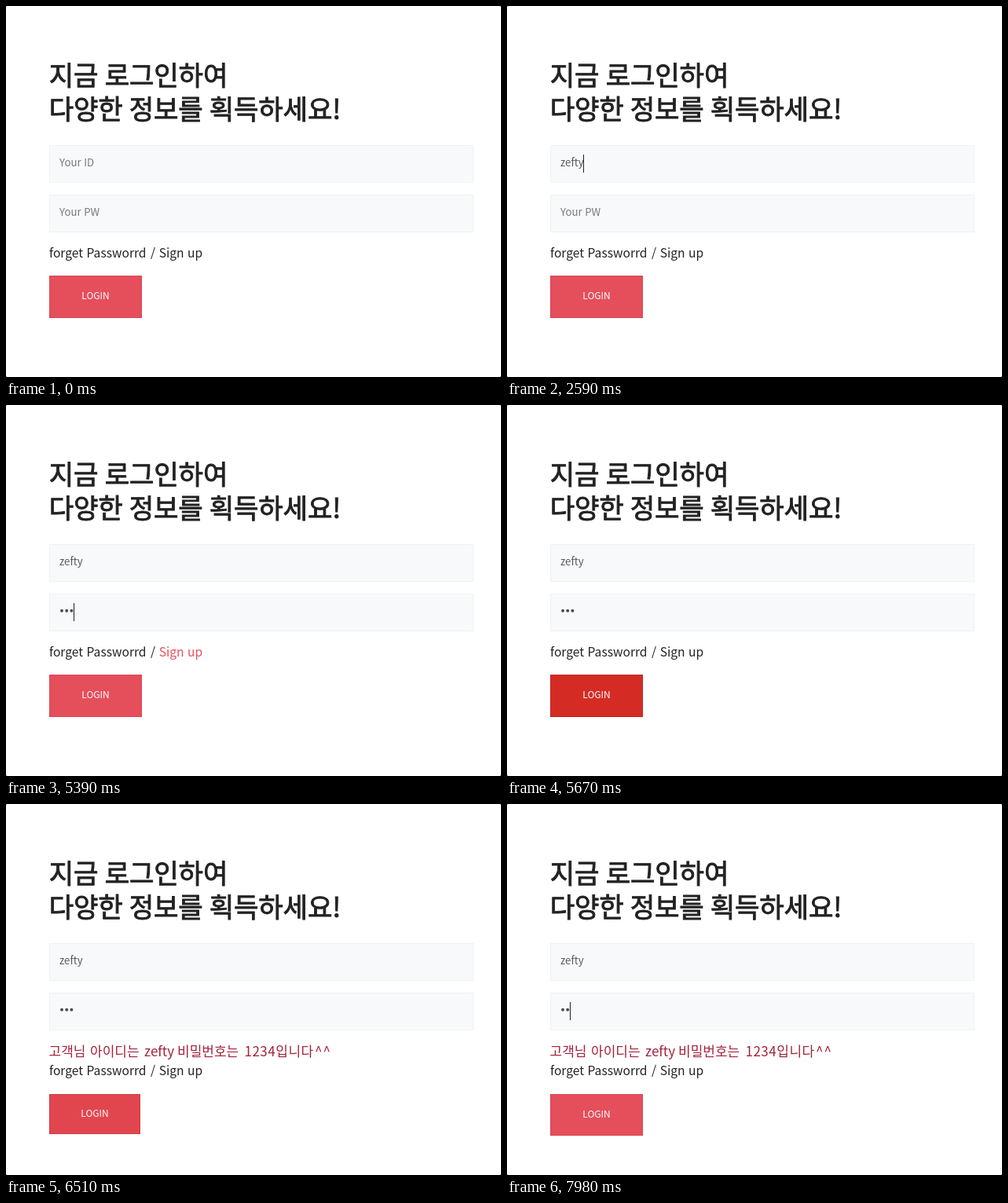
Recreate the animation shown at these times as an HTML page. Size 630x472 px, loop 8000 ms.

```html
<!DOCTYPE html>
<html lang="ko">
<head>
<meta charset="utf-8">
<title>Login form</title>
<style>
  html, body { margin: 0; width: 100%; height: 100%; overflow: hidden; background: #fff; }
  svg { display: block; width: 630px; height: 472px; }
  text { font-family: "Noto Sans CJK KR", "Noto Sans CJK", "Noto Sans", sans-serif; white-space: pre; }
  .head { font-size: 34.2px; font-weight: 500; letter-spacing: -.15px; fill: #222; stroke: #222; stroke-width: .9px; }
  .field { fill: #f8f9fb; stroke: #f1f1f3; }
  .input { font-size: 13.2px; fill: #55595e; }
  .hint { font-size: 13.2px; fill: #77797c; }
  .links { font-size: 15.6px; fill: #222; }
  .error { font-size: 17px; font-weight: 300; fill: #a3213b; }
  .label { font-size: 12px; fill: #fff; text-anchor: middle; }
  .caret { fill: #222; }
</style>
</head>
<body>
<svg viewBox="0 0 630 472">
  <rect width="630" height="472" fill="#fff"/>
  <path d="M0 0h1v1h-1zM629 0h1v1h-1zM0 471h1v1h-1zM629 471h1v1h-1z" fill="#888"/>
  <text class="head" y="100.5"><tspan x="54.7">지금</tspan><tspan x="125.7">로그인하여</tspan></text>
  <text class="head" y="143.5"><tspan x="54.7">다양한</tspan><tspan x="156.7">정보를</tspan><tspan x="258.7">획득하세요!</tspan></text>

  <rect class="field" x="55.5" y="177.5" width="539" height="47"/>
  <rect class="field" x="55.5" y="240.5" width="539" height="47"/>
  <text class="hint" id="idHint" x="68" y="204">Your ID</text>
  <text class="input" id="idText" x="68" y="204"></text>
  <text class="hint" id="pwHint" x="68" y="267">Your PW</text>
  <g id="dots" fill="#4a4d52">
    <circle cx="71" cy="261.7" r="2"/>
    <circle cx="77.2" cy="261.7" r="2"/>
    <circle cx="83.4" cy="261.7" r="2"/>
  </g>
  <rect class="caret" id="idCaret" y="189" width="1" height="23"/>
  <rect class="caret" id="pwCaret" y="252" width="1" height="23"/>

  <text class="error" id="error" y="321"><tspan x="54.5">고객님</tspan><tspan x="107">아이디는</tspan><tspan x="176">zefty</tspan><tspan x="218">비밀번호는</tspan><tspan x="303.5" letter-spacing=".5">1234입니다</tspan><tspan x="393" letter-spacing="1">^^</tspan></text>
  <g id="links">
    <text class="links" x="55" y="320">forget Passworrd</text>
    <text class="links" x="184" y="320">/</text>
    <text class="links" id="signUp" x="194.7" y="320">Sign up</text>
  </g>
  <rect id="button" x="55"/>
  <rect id="edge" x="55.5" fill="none" stroke="#801030"/>
  <text class="label" id="label">LOGIN</text>
</svg>
<script>
const LOOP = 8000, STEP = 70, BLINK = 525, USER = "zefty";
const REST = [229, 78, 91], HOT = [203, 26, 7];

// moments of each action, in ms
const idFocus = 1120, idKeys = [1470, 1960, 2100, 2380, 2590];
const pwFocus = 3290, pwKeys = [4620, 4760, 5040, 7840, 7980], pwErase = [7490, 7630, 7700];
const pwBlur = 5600, answer = 6160, pwRefocus = 6860;

const $ = id => document.getElementById(id);
const show = (id, on) => $(id).style.display = on ? "" : "none";
const set = (id, attrs) => { for (const k in attrs) $(id).setAttribute(k, attrs[k]); };
const within = (t, a, b) => t >= a && t < b;
const past = (times, t) => times.filter(k => k <= t);
const ramp = (t, a, b) => Math.min(1, Math.max(0, (t - a) / (b - a)));
const ease = p => p * (2 - p);

// the caret restarts its blink at every focus and key
function caretOn(t, starts) {
  const since = t - Math.max(...past(starts, t));
  return since % (2 * BLINK) < BLINK;
}

function drawFields(t) {
  const typed = past(idKeys, t).length;
  $("idText").textContent = USER.slice(0, typed);
  show("idHint", !typed);
  show("idCaret", within(t, idFocus, pwFocus) && caretOn(t, [idFocus, ...idKeys]));
  const width = typed ? $("idText").getComputedTextLength() : 0;
  set("idCaret", { x: 68 + Math.floor(width) });

  const dots = past(pwKeys, t).length - past(pwErase, t).length;
  [...$("dots").children].forEach((dot, i) => dot.style.display = i < dots ? "" : "none");
  show("pwHint", !dots);
  const focused = within(t, pwFocus, pwBlur) || t >= pwRefocus;
  show("pwCaret", focused && caretOn(t, [pwFocus, pwRefocus, ...pwKeys]));
  set("pwCaret", { x: 68 + 6 * dots });
}

function drawButton(t, failed) {
  const heat = ease(ramp(t, 5530, 5870)) - ease(ramp(t, 6300, 6650));
  const shrink = ramp(t, 5880, 6090) - ramp(t, 6790, 7070);
  const color = REST.map((c, i) => Math.round(c + (HOT[i] - c) * heat));
  const y = failed ? 369 : 343;
  const width = 118 - 2 * shrink, height = (failed ? 53 : 54) - 2 * shrink;
  set("button", { y, width, height, fill: `rgb(${color})` });
  set("edge", { y: y + .5, width: width - 1, height: height - 1, "stroke-opacity": .12 + .2 * heat });
  set("label", { x: 114 - shrink, y: y + 30 - shrink });
}

function draw(time) {
  const t = time % LOOP, failed = t >= answer;
  drawFields(t);
  drawButton(Math.floor(t / STEP) * STEP, failed);
  show("error", failed);
  set("links", { transform: `translate(0 ${failed ? 25 : 0})` });
  $("signUp").style.fill = within(t, 5390, 5460) ? "#e64f5e" : "";
}

const start = performance.now();
function tick() {
  draw(performance.now() - start);
  requestAnimationFrame(tick);
}
tick();
</script>
</body>
</html>
```
